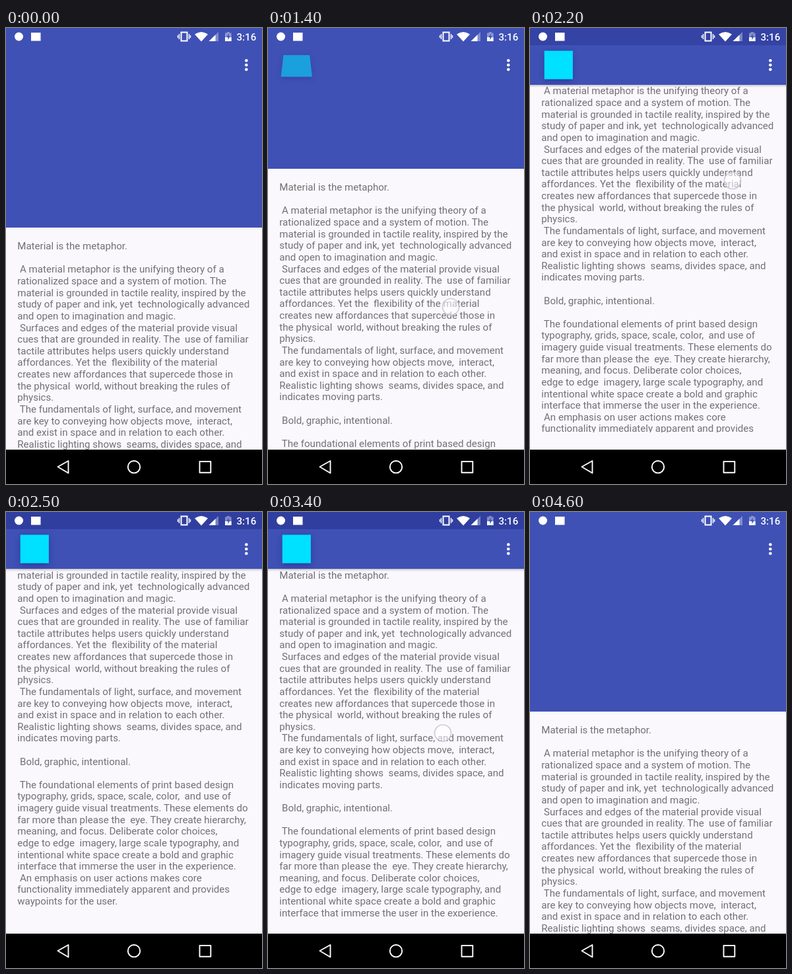
An HTML page for the animation above (4700 ms loop, 388x690 px).

```html
<!DOCTYPE html>
<html lang="en">
<head>
<meta charset="utf-8">
<title>Collapsing toolbar</title>
<style>
html, body { margin: 0; width: 100%; height: 100%; overflow: hidden; background: #faf8fc; }
svg { display: block; width: 100%; height: 100%; }
text { font-family: Roboto, sans-serif; white-space: pre; }
#copy { font-size: 15.09px; fill: #717073; }
</style>
</head>
<body>
<svg viewBox="0 0 388 690">
  <defs>
    <clipPath id="page"><rect id="pageClip" width="388" height="638"/></clipPath>
    <linearGradient id="fade" x2="0" y2="1">
      <stop stop-color="#000" stop-opacity=".2"/>
      <stop offset="1" stop-color="#000" stop-opacity="0"/>
    </linearGradient>
    <filter id="soft" x="-60%" y="-60%" width="220%" height="220%">
      <feGaussianBlur stdDeviation="4"/>
    </filter>
  </defs>

  <rect width="388" height="690" fill="#faf8fc"/>
  <g clip-path="url(#page)"><g id="copy"></g></g>
  <circle id="touch" r="12.5" fill="#fff" fill-opacity=".55" stroke="#c5bdd6" stroke-opacity=".8" stroke-width="1.6"/>

  <rect id="shade" width="388" height="4" fill="url(#fade)"/>
  <rect id="header" width="388" fill="#3f51b5"/>
  <g id="card">
    <polygon id="cardShadow" fill="#1a237e" opacity=".5" filter="url(#soft)" transform="translate(0 3)"/>
    <polygon id="cardFace" fill="#00e0ff"/>
  </g>
  <rect id="scrim" width="388" height="26" fill="#303f9f"/>

  <g fill="#fff">
    <circle cx="19.5" cy="13" r="6.5"/>
    <rect x="38" y="7" width="14.5" height="12.5"/>
    <path d="M265.5 6.5h9v13h-9z" fill="none" stroke="#fff" stroke-width="2"/>
    <path d="M262.5 9v8M277.5 9v8M260.5 11v4M279.5 11v4" stroke="#fff" stroke-width="1.4"/>
    <path d="M286 9.500Q296 2.500 306 9.500L296 20.500Z"/>
    <path d="M322 6V20H307.500Z" opacity=".35"/>
    <path d="M317.500 10.300V20H307.500Z"/>
    <path d="M332 7.500h2.800v-1.500h4v1.500h2.800v12.500h-9.600z" opacity=".4"/>
    <path d="M332 14h9.600v6h-9.600z"/>
    <path d="M337.600 8.500l-3.400 5.500h2.200v4l3.400-5.500h-2.200z" fill="#3f51b5"/>
    <text x="349.500" y="18.700" font-size="15.1" font-weight="500">3:16</text>
    <circle cx="364.300" cy="49.300" r="2.300"/>
    <circle cx="364.300" cy="56" r="2.300"/>
    <circle cx="364.300" cy="62.700" r="2.300"/>
  </g>

  <rect y="638" width="388" height="52"/>
  <g fill="none" stroke="#fff" stroke-width="1.9" stroke-linejoin="round">
    <path d="M78.500 664L94.500 655V673.500Z"/>
    <circle cx="194" cy="664.200" r="9.200"/>
    <path d="M293.500 656h16.800v16.800h-16.800z"/>
  </g>
</svg>
<script>
const LOOP = 4700, STEP = 100;
const OPEN = 302, CLOSED = 86, LINE = 17.62;
const COPY = `Material is the metaphor.

 A material metaphor is the unifying theory of a
rationalized space and a system of motion. The
material is grounded in tactile reality, inspired by the
study of paper and ink, yet  technologically advanced
and open to imagination and magic.
 Surfaces and edges of the material provide visual
cues that are grounded in reality. The  use of familiar
tactile attributes helps users quickly understand
affordances. Yet the  flexibility of the material
creates new affordances that supercede those in
the physical  world, without breaking the rules of
physics.
 The fundamentals of light, surface, and movement
are key to conveying how objects move,  interact,
and exist in space and in relation to each other.
Realistic lighting shows  seams, divides space, and
indicates moving parts.

 Bold, graphic, intentional.

 The foundational elements of print based design
typography, grids, space, scale, color,  and use of
imagery guide visual treatments. These elements do
far more than please the  eye. They create hierarchy,
meaning, and focus. Deliberate color choices,
edge to edge  imagery, large scale typography, and
intentional white space create a bold and graphic
interface that immerse the user in the experience.
 An emphasis on user actions makes core
functionality immediately apparent and provides
waypoints for the user.`;

// Each key is [time, value, ...]
const SCROLL = [[1000, 0], [1400, 89], [1800, 167], [2200, 270], [2300, 292], [2400, 302], [2500, 305]];
const SWIPE_UP = [[1000, 279, 512], [1400, 277, 422], [1800, 277, 344], [2200, 307, 231], [2300, 316, 208]];
const SWIPE_DOWN = [[2800, 290, 252], [3100, 288, 261], [3300, 272, 302], [3500, 258, 367],
  [3800, 248, 490], [4100, 256, 568], [4500, 271, 612]];
const SCRIM = [[1900, 0], [2300, 1], [3400, 1], [3700, 0]];

const $ = id => document.getElementById(id);
const clamp = (v, lo, hi) => Math.min(hi, Math.max(lo, v));
const set = (id, attrs) => {
  for (const name in attrs) $(id).setAttribute(name, attrs[name]);
};

function sample(keys, t, col = 1) {
  if (t <= keys[0][0]) return keys[0][col];
  for (let i = 1; i < keys.length; i++) {
    const a = keys[i - 1], b = keys[i];
    if (t <= b[0]) return a[col] + (b[col] - a[col]) * (t - a[0]) / (b[0] - a[0]);
  }
  return keys[keys.length - 1][col];
}

COPY.split("\n").forEach((line, i) => {
  const el = document.createElementNS("http://www.w3.org/2000/svg", "text");
  el.setAttribute("x", 17.25);
  el.setAttribute("y", 335.2 + i * LINE);
  el.textContent = line;
  $("copy").append(el);
});

// Square tilted about its horizontal centre line, seen in perspective
function tiltedSquare(angle) {
  const cx = 43.3, cy = 56, half = 21.6, depth = 165;
  const project = (x, side) => {
    const scale = depth / (depth - side * half * Math.sin(angle));
    return `${cx + x * half * scale},${cy + side * half * Math.cos(angle) * scale}`;
  };
  return [project(-1, -1), project(1, -1), project(1, 1), project(-1, 1)].join(" ");
}

function render(t) {
  const swipe = t < 2700 ? SWIPE_UP : SWIPE_DOWN;
  const x = sample(swipe, t, 1), y = sample(swipe, t, 2);
  const touching = t >= swipe[0][0] && t <= swipe[swipe.length - 1][0];
  const idle = t < 1000 || t > 4500;
  const scroll = idle ? 0 : t < 2700 ? sample(SCROLL, t) : clamp(569 - y, 0, 305);
  const header = Math.max(CLOSED, OPEN - scroll);
  const tilt = clamp((header - 139) / (OPEN - 139), 0, 1);
  const points = tiltedSquare(tilt * Math.PI / 2);

  set("copy", { transform: `translate(0 ${-scroll})` });
  set("pageClip", { height: header > CLOSED ? 638 : 612 });
  set("touch", { cx: x, cy: y, visibility: touching ? "visible" : "hidden" });
  set("header", { height: header });
  set("shade", { y: header, opacity: header > CLOSED ? 0 : 1 });
  set("card", { opacity: 1 - tilt });
  set("cardFace", { points });
  set("cardShadow", { points });
  set("scrim", { opacity: sample(SCRIM, t) });
}

const start = performance.now();
function tick() {
  const t = (performance.now() - start) % LOOP;
  render(Math.floor(t / STEP) * STEP);
  requestAnimationFrame(tick);
}
tick();
</script>
</body>
</html>
```
